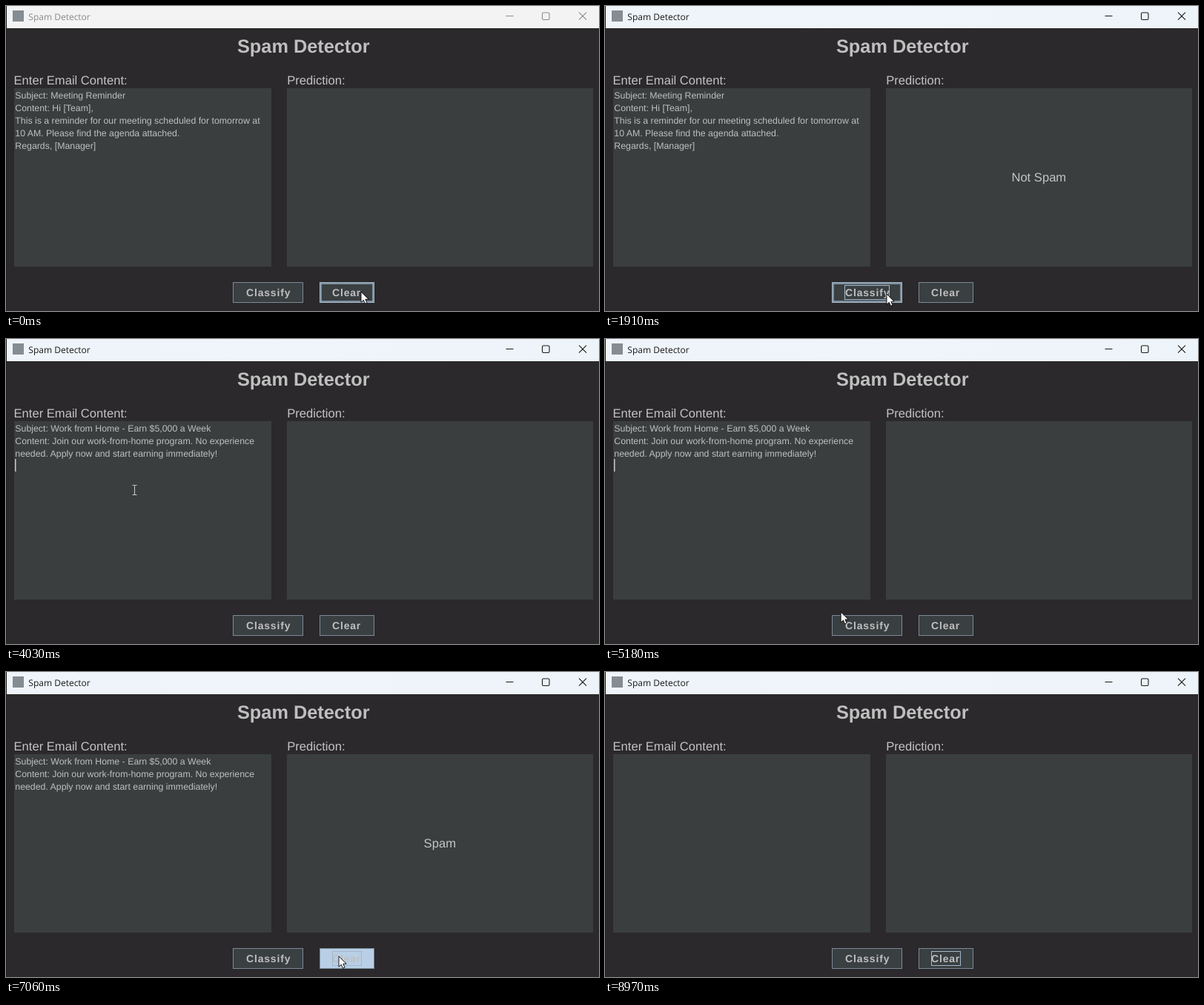
An HTML page for the animation above (9000 ms loop, 800 px wide and 412 px high).

```html
<!DOCTYPE html>
<html lang="en">
<head>
<meta charset="utf-8">
<title>Spam Detector</title>
<style>
  html, body { margin: 0; width: 100%; height: 100%; overflow: hidden; background: #2b292b; }
  svg { display: block; width: 800px; height: 412px; }
  text { font-family: "Liberation Sans", Arial, sans-serif; fill: #bfbfbf; text-rendering: geometricPrecision; white-space: pre; }
  .caption { font: 12px "Open Sans", sans-serif; }
  .heading { font-size: 25.3px; font-weight: bold; }
  .label { font-size: 16.6px; fill: #c4c4c4; }
  .mail { font-size: 12.33px; }
  .btn { font-size: 14px; font-weight: bold; letter-spacing: .82px; }
</style>
</head>
<body>
<svg id="stage" viewBox="0 0 800 412" xmlns="http://www.w3.org/2000/svg">
  <defs>
    <linearGradient id="bar">
      <stop offset="0" stop-color="#eef4f9"/>
      <stop offset=".5" stop-color="#f0f4fb"/>
      <stop offset="1" stop-color="#edf4f9"/>
    </linearGradient>
  </defs>
</svg>
<script>
const LOOP = 9000;
const NS = "http://www.w3.org/2000/svg";
const stage = document.getElementById("stage");

function add(tag, attrs, parent = stage) {
  const node = document.createElementNS(NS, tag);
  for (const key in attrs) node.setAttribute(key, attrs[key]);
  parent.appendChild(node);
  return node;
}
const rect = (x, y, width, height, attrs, parent) =>
  add("rect", { x, y, width, height, ...attrs }, parent);
function label(str, x, y, cls, attrs, parent) {
  const node = add("text", { x, y, class: cls, ...attrs }, parent);
  node.textContent = str;
  return node;
}
const show = (node, on) => node.setAttribute("visibility", on ? "visible" : "hidden");

// Window
rect(0, 0, 800, 412, { fill: "#2b292b" });
const bar = rect(0, 0, 800, 30, {});
rect(0, 0, 1, 412, { fill: "#201e20" });
rect(9, 6, 15, 15, { fill: "#858c92" });
const caption = label("Spam Detector", 30.3, 18.5, "caption");
const controls = add("path", {
  d: "M674.5 13.5h10M725 9h6.5q1.5 0 1.5 1.5v6.5q0 1.5 -1.5 1.5h-6.5q-1.5 0 -1.5 -1.5v-6.5q0 -1.5 1.5 -1.5zM773 8.7l10 10M783 8.7l-10 10",
  fill: "none", "stroke-width": 1.1
});

// Content
label("Spam Detector", 312, 63, "heading");
label("Enter Email Content:", 10.5, 106, "label");
label("Prediction:", 379.2, 106, "label");
rect(11, 111, 347, 241, { fill: "#3a3e3f" });
rect(379, 111, 413, 241, { fill: "#3a3e3f" });

const LINE = 16.9;
function mail(lines) {
  const group = add("g", {});
  lines.forEach((line, i) => label(line, 12.3, 125 + LINE * i, "mail", {}, group));
  return group;
}
const meeting = mail([
  "Subject: Meeting Reminder",
  "Content: Hi [Team],",
  "This is a reminder for our meeting scheduled for tomorrow at",
  "10 AM. Please find the agenda attached.",
  "Regards, [Manager]"
]);
const offer = mail([
  "Subject: Work from Home - Earn $5,000 a Week",
  "Content: Join our work-from-home program. No experience",
  "needed. Apply now and start earning immediately!"
]);
const caret = rect(12, 0, 1.5, 17, { fill: "#c8c8c8" });
const result = label("", 585.3, 237, "label", { "text-anchor": "middle" });

// Buttons
function button(str, x, w, textX, focusX, focusW) {
  const y = 373, h = 28;
  const face = rect(x + .5, y + .5, w - 1, h - 1, { stroke: "#7a8a99" });
  const glow = add("g", { fill: "none" });
  ["#b0c6db", "#7a8a99", "#b0c6db"].forEach((stroke, i) => {
    const d = .45 + i * .85;
    rect(x + d, y + d, w - 2 * d, h - 2 * d, { stroke, "stroke-width": .9 }, glow);
  });
  label(str, textX, 392.3, "btn");
  const focus = rect(focusX + .5, 377.5, focusW - 1, 19, { fill: "none", stroke: "#a3b8cc" });
  return {
    update(cursor, pressed, focused) {
      const over = cursor.x >= x && cursor.x < x + w && cursor.y >= y && cursor.y < y + h;
      face.setAttribute("fill", pressed ? "#b8cfe5" : "#3a3f41");
      show(glow, over && !pressed);
      show(focus, focused);
    }
  };
}
const classify = button("Classify", 306, 95, 324, 323, 61);
const clear = button("Clear", 423, 74, 440, 440, 40);

// Pointers
const arrow = add("path", {
  d: "M0 0V14.2L3.3 11.2L5.5 16.2L8 15.1L5.8 10.2H10.2Z",
  fill: "#fff", stroke: "#000", "stroke-width": .9, "stroke-linejoin": "round"
});
const beam = add("path", {
  d: "M-3 -6.5H-1Q0 -6.5 0 -5.5V5.5Q0 6.5 -1 6.5H-3M3 -6.5H1Q0 -6.5 0 -5.5M0 5.5Q0 6.5 1 6.5H3",
  fill: "none", stroke: "#c4c4c4", "stroke-width": 1.1
});

// Pointer stops: time, x, y
const path = [
  [0, 479, 386], [250, 479, 386], [760, 380, 389], [2150, 380, 389],
  [2650, 435, 392], [3180, 435, 392], [3650, 173.5, 204], [4650, 173.5, 204],
  [5350, 343, 397], [6200, 343, 397], [6780, 449, 384], [7400, 449, 384],
  [7900, 850, 240], [LOOP, 850, 240]
];
function pointer(t) {
  const i = path.findIndex(stop => stop[0] > t);
  const [t0, x0, y0] = path[i - 1], [t1, x1, y1] = path[i];
  const s = (t - t0) / (t1 - t0), k = s * s * (3 - 2 * s);
  return { x: x0 + (x1 - x0) * k, y: y0 + (y1 - y0) * k };
}

// Value in force at time t from a list of [start, value]
const at = (steps, t) => steps.filter(step => step[0] <= t).pop()[1];
const focusSteps = [[0, ""], [850, "classify"], [2980, "clear"], [3750, "mail"], [5550, "classify"], [6990, "clear"]];
const pressSteps = [[0, ""], [850, "classify"], [1000, ""], [2980, "clear"], [3100, ""],
  [5550, "classify"], [5680, ""], [6990, "clear"], [7120, ""]];
const mailSteps = [[0, "meeting"], [3100, ""], [3880, "offer"], [7120, ""]];
const resultSteps = [[0, ""], [1000, "Not Spam"], [3100, ""], [5680, "Spam"], [7120, ""]];

function draw(t) {
  const cursor = pointer(t), focus = at(focusSteps, t), press = at(pressSteps, t), content = at(mailSteps, t);
  const active = t >= 850;
  bar.setAttribute("fill", active ? "url(#bar)" : "#f3f3f3");
  caption.style.fill = active ? "#1a1a1a" : "#8a8a8a";
  controls.setAttribute("stroke", active ? "#1a1a1a" : "#8c8c8c");

  show(meeting, content === "meeting");
  show(offer, content === "offer");
  result.textContent = at(resultSteps, t);

  const blinkFrom = content === "offer" ? 3880 : 3750;
  caret.setAttribute("y", content === "offer" ? 162 : 111);
  show(caret, focus === "mail" && (t - blinkFrom) % 1000 < 500);

  classify.update(cursor, press === "classify", focus === "classify");
  clear.update(cursor, press === "clear", focus === "clear");

  const inMail = cursor.x > 11 && cursor.x < 358 && cursor.y > 111 && cursor.y < 352;
  show(arrow, !inMail);
  show(beam, inMail);
  (inMail ? beam : arrow).setAttribute("transform", `translate(${cursor.x.toFixed(2)} ${cursor.y.toFixed(2)})`);
}

const start = performance.now();
function tick() {
  draw((performance.now() - start) % LOOP);
  requestAnimationFrame(tick);
}
tick();
</script>
</body>
</html>
```
